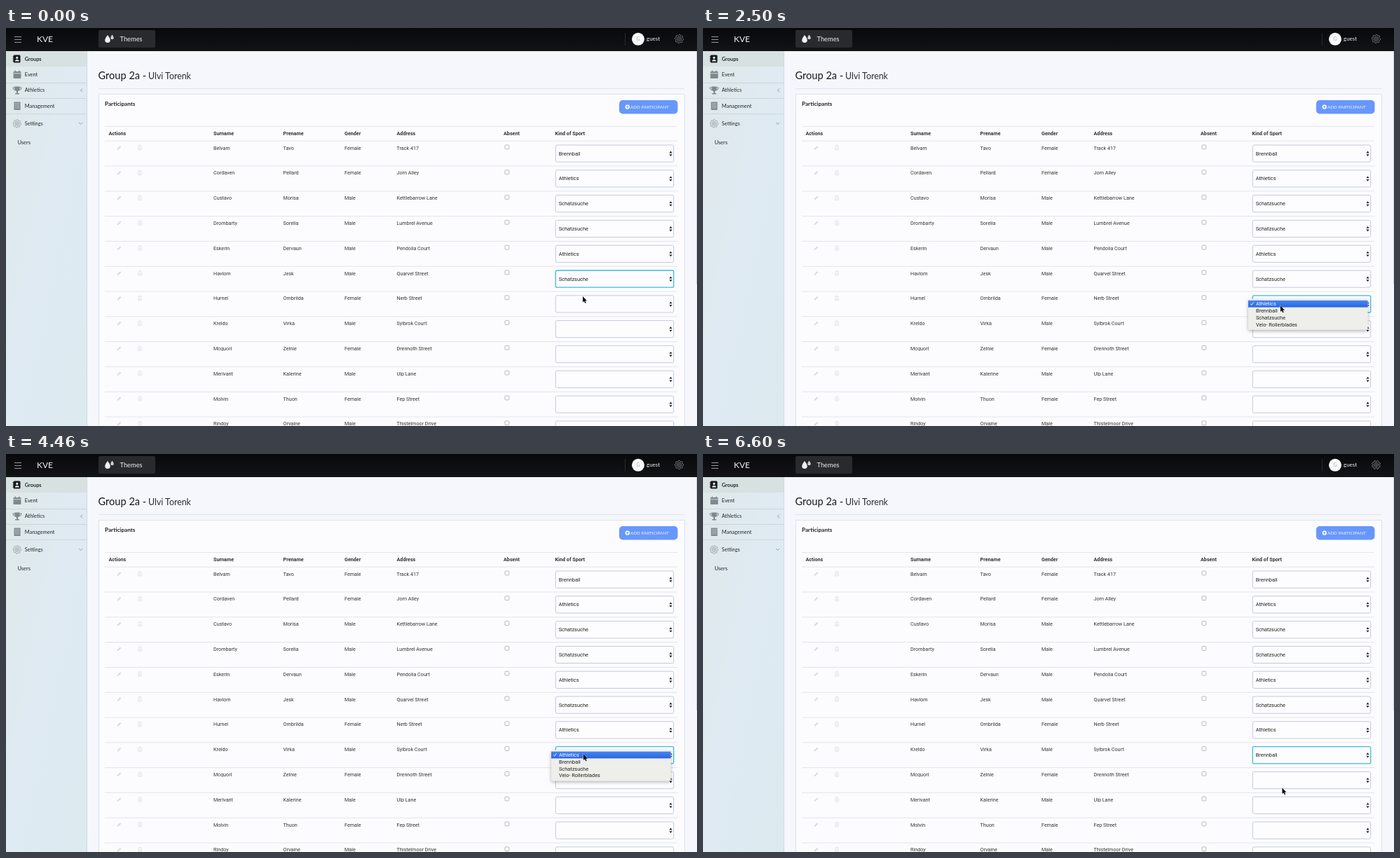
Write an HTML page that moves like this. It is 986x568 px and loops after 6.62 s.

```html
<!DOCTYPE html>
<html lang="en">
<head>
<meta charset="utf-8">
<title>Participants</title>
<style>
  html, body { margin: 0; width: 100%; height: 100%; overflow: hidden; background: #f5f7fd; }
  svg { display: block; width: 986px; height: 568px; }
  text { white-space: pre; }
  .ui { font-family: Lato, sans-serif; }
  .body { font-family: Roboto, sans-serif; font-size: 7.2px; fill: #333; }
  .value { font-family: Roboto, sans-serif; font-size: 7.4px; fill: #222; }
</style>
</head>
<body>
<svg id="stage" viewBox="0 0 986 568" xmlns="http://www.w3.org/2000/svg">
  <defs>
    <linearGradient id="side" x1="0" y1="0" x2="1" y2="1">
      <stop offset="0" stop-color="#dfe9e9"/><stop offset=".5" stop-color="#dfeaf3"/><stop offset="1" stop-color="#dcebf0"/>
    </linearGradient>
    <linearGradient id="bar" x1="0" y1="0" x2="0" y2="1">
      <stop offset="0" stop-color="#08090c"/><stop offset="1" stop-color="#121315"/>
    </linearGradient>
    <linearGradient id="pick" x1="0" y1="0" x2="0" y2="1">
      <stop offset="0" stop-color="#4585f3"/><stop offset="1" stop-color="#2b66e2"/>
    </linearGradient>
    <filter id="shadow" x="-10%" y="-20%" width="120%" height="150%">
      <feDropShadow dx="0" dy="2" stdDeviation="2.5" flood-color="#000" flood-opacity=".3"/>
    </filter>
  </defs>
</svg>
<script>
const LOOP = 6620, PITCH = 35.8;
const OPTIONS = ['Athletics', 'Brennball', 'Schatzsuche', 'Velo- Rollerblades'];
const PEOPLE = [
  ['Belvarn', 'Tavo', 'Female', 'Track 417', 1],
  ['Cordaven', 'Pellard', 'Female', 'Jorn Alley', 0],
  ['Custavo', 'Morisa', 'Male', 'Kettlebarrow Lane', 2],
  ['Drombarty', 'Sorelia', 'Male', 'Lumbrel Avenue', 2],
  ['Eskerin', 'Dervaun', 'Male', 'Pendolia Court', 0],
  ['Havlom', 'Jesk', 'Male', 'Quarvel Street', 2],
  ['Hurnel', 'Ombrilda', 'Female', 'Nerb Street'],
  ['Kreldo', 'Virka', 'Male', 'Sylbrok Court'],
  ['Mcquorl', 'Zelnie', 'Female', 'Drennoth Street'],
  ['Merivant', 'Kalerine', 'Male', 'Ulp Lane'],
  ['Molvin', 'Thuon', 'Female', 'Fep Street'],
  ['Rindoy', 'Orvaine', 'Male', 'Thistelmoor Drive']
];
const COLUMNS = [296, 395.5, 483, 557.5];

// Each visit to a list: which row, when it opens, takes focus, blinks, fades and sets the value
const VISITS = [
  { row: 6, choice: 0, open: 780, focus: 1200, blink: 2590, fade: 2700, closed: 2900, set: 3000 },
  { row: 7, choice: 1, open: 3740, focus: 3960, blink: 5440, fade: 5560, closed: 5720, set: 5780 }
];
const CURSOR = [
  [0, 823, 383], [640, 823, 393], [1000, 823, 393], [1500, 824, 396.5], [2600, 824, 396.5],
  [2960, 823.5, 407.5], [3100, 823.5, 408], [3640, 824, 428.5], [4760, 824, 428.5],
  [5180, 824, 436.5], [5700, 824, 436.5], [6500, 826.5, 476.5], [LOOP, 826.5, 476.5]
];

const stage = document.getElementById('stage');

function add(parent, tag, attrs, content) {
  const node = document.createElementNS('http://www.w3.org/2000/svg', tag);
  for (const key in attrs) node.setAttribute(key, attrs[key]);
  if (content !== undefined) node.textContent = content;
  parent.appendChild(node);
  return node;
}
const rect = (x, y, width, height, fill, more, parent = stage) =>
  add(parent, 'rect', { x, y, width, height, fill, ...more });
const path = (d, stroke, width = 1, more, parent = stage) =>
  add(parent, 'path', { d, stroke, 'stroke-width': width, fill: 'none', ...more });
const circle = (cx, cy, r, fill, more, parent = stage) =>
  add(parent, 'circle', { cx, cy, r, fill, ...more });
const label = (x, y, content, kind, more, parent = stage) =>
  add(parent, 'text', { x, y, class: kind, ...more }, content);
const ui = (x, y, content, size, fill = '#222', weight = 400, more) =>
  label(x, y, content, 'ui', { 'font-size': size, fill, 'font-weight': weight, ...more });

function gear(x, y, r, color, width) {
  const group = add(stage, 'g', { transform: `translate(${x} ${y})` });
  const wheel = add(group, 'g', {});
  let d = '';
  for (let i = 0; i < 32; i++) {
    const a = i * Math.PI / 16, q = i % 4 < 2 ? r : r * 0.8;
    d += `${i ? 'L' : 'M'}${(q * Math.cos(a)).toFixed(2)} ${(q * Math.sin(a)).toFixed(2)}`;
  }
  path(d + 'Z', color, width, {}, wheel);
  circle(0, 0, r * 0.5, 'none', { stroke: color, 'stroke-width': width }, wheel);
  circle(0, 0, r * 0.2, 'none', { stroke: color, 'stroke-width': width }, wheel);
  return wheel;
}

function drawSidebar() {
  rect(0, 33, 115, 535, 'url(#side)');
  rect(0, 33, 115, 22, '#d8e1e2');
  path('M0 78.5H115M0 100.5H115M0 122.5H115', '#c6d2d6', 0.8);
  path('M115.5 33V568', '#cfd9e2');
  const items = [['Groups', 47, 700], ['Event', 69], ['Athletics', 91.3], ['Management', 113.6], ['Settings', 138.6]];
  for (const [name, y, weight] of items) ui(26.8, y, name, 7.4, '#222a2e', weight);
  ui(16.5, 165.5, 'Users', 7.5, '#222a2e');

  rect(10.5, 38.5, 10, 11, '#16191b', { rx: 1.5 });
  circle(15.8, 42.4, 1.6, '#e4eaea');
  path('M12.8 47.6Q13 45 15.8 45T18.8 47.6Z', 'none', 0, { fill: '#e4eaea' });
  path('M9.6 41H11.4M9.6 44H11.4M9.6 47H11.4', '#16191b');

  const grey = '#7f898d';
  rect(10.5, 62, 11, 10, grey, { rx: 1 });
  path('M10.5 64.7H21.5', '#dce7ea', 0.8);
  path('M13.2 60.5V63M18.8 60.5V63', grey, 1.4);
  path('M12.3 83.5H19.7V87Q19.2 90.2 16 90.5Q12.8 90.2 12.3 87ZM15 90H17V93H19V94.5H13V93H15Z', 'none', 0, { fill: grey });
  path('M12.3 85H9.8Q10 88.5 13.3 88.8M19.7 85H22.2Q22 88.5 18.7 88.8', grey, 1);
  rect(11.5, 105.5, 9, 11.5, grey);
  path('M13.8 107V115M16 107V115M18.2 107V115', '#dce7ea', 1, { 'stroke-dasharray': '1.4 1' });
  gear(15.8, 136.5, 5.8, '#8d979b', 0.8);
  path('M109 86.5L106.5 89L109 91.5M104.2 135L106.7 137.5L109.2 135', '#7d888c', 0.8);
}

function drawHeader() {
  rect(0, 0, 986, 33, 'url(#bar)');
  path('M12 12.5H22M12 16.5H22M12 20.5H22', '#a8a8a8', 0.9);
  ui(44, 20, 'KVE', 12, '#f2f2f2');
  rect(132, 3, 81, 25, '#292a2e', { rx: 2 });
  path('M145 10Q148.8 15 148.8 17.2A3.8 3.8 0 0 1 141.2 17.2Q141.2 15 145 10Z', 'none', 0, { fill: '#f1f1f3' });
  path('M151.5 9.5Q153.8 12.6 153.8 14A2.3 2.3 0 0 1 149.2 14Q149.2 12.6 151.5 9.5Z', 'none', 0, { fill: '#cfd0d4' });
  ui(162.5, 19.2, 'Themes', 9.3, '#eee');
  path('M883.5 7V25', '#303236', 0.8);
  circle(902, 15.8, 9, '#fafafa');
  ui(902, 18.2, 'G', 6.8, '#aaa', 400, { 'text-anchor': 'middle' });
  ui(914, 18.4, 'guest', 8, '#f0f0f0');
  return gear(960.5, 15.5, 6.2, '#85878b', 0.8);
}

function drawCard() {
  ui(131.5, 73, 'Group 2a -', 14.6, '#171a1d');
  ui(203, 73, 'Ulvi Torenk', 12.4, '#2a2d30');
  path('M132 86.5H968', '#dfe3ee', 0.9);
  rect(132.5, 94.5, 836, 490, '#fcfcfe', { stroke: '#dde1ea' });
  path('M985.5 33V366', '#d0d5e2');
  ui(141, 111, 'Participants', 8.2, '#1d2023', 700);
  rect(875, 103, 83.5, 19.5, '#6897fb', { rx: 5 });
  circle(886.8, 112.6, 3.2, '#fff');
  path('M885 112.6H888.6M886.8 110.8V114.4', '#6897fb', 1);
  ui(891, 114.8, 'ADD PARTICIPANT', 6.3, '#f1f5ff');
  path('M141 140.5H958M141 161.2H958', '#dfe2e8', 0.9);
  const heads = [[146.5, 'Actions'], [296, 'Surname'], [395.5, 'Prename'], [483, 'Gender'],
    [557.5, 'Address'], [710, 'Absent'], [783.5, 'Kind of Sport']];
  for (const [x, name] of heads) label(x, 153.3, name, 'body', { 'font-weight': 700 });
}

function drawRow(person, i) {
  const y = i * PITCH;
  const row = add(stage, 'g', { transform: `translate(0 ${y.toFixed(1)})` });
  path('M141 197H958', '#dfe2e8', 0.9, {}, row);
  path('M158.5 173.8L159 172L162.8 168.2L164.3 169.7L160.4 173.4Z', 'none', 0, { fill: '#d9dade' }, row);
  path('M188.2 168.7H193.8M190 168V167.4H192V168M188.8 169.5V174H193.2V169.5M190.2 170.5V173M191.8 170.5V173', '#dcdde1', 0.7, {}, row);
  COLUMNS.forEach((x, c) => label(x, 173.5, person[c], 'body', {}, row));
  rect(712, 167, 5.8, 5.8, '#fff', { rx: 1.2, stroke: '#a3a5aa', 'stroke-width': 0.8 }, row);
  const box = rect(784.3, 167, 168.4, 24.2, '#fdfdff', { rx: 2, stroke: '#bfc3d8', 'stroke-width': 0.9 }, row);
  path('M946.4 178.4L948.5 175.6L950.6 178.4ZM946.4 180.2L948.5 183L950.6 180.2Z', 'none', 0, { fill: '#222' }, row);
  const value = label(788.7, 181.5, OPTIONS[person[4]] || '', 'value', {}, row);
  return { box, value };
}

function drawMenu() {
  const group = add(stage, 'g', {});
  rect(778, 0, 170.5, 44, '#eeeeeb', { rx: 2.5, filter: 'url(#shadow)' }, group);
  const bar = rect(778, 2.3, 170.5, 9.8, 'url(#pick)', {}, group);
  const check = path('M781.2 7.2L782.7 9L785.4 4.9', '#222', 0.9, {}, group);
  const items = OPTIONS.map((name, i) => label(788.9, 9.7 + i * 9.8, name, 'value', {}, group));
  return { group, bar, check, items };
}

rect(0, 0, 986, 568, '#f5f7fd');
drawSidebar();
const wheel = drawHeader();
drawCard();
const rows = PEOPLE.map(drawRow);
const menu = drawMenu();
const pointer = path('M0 0V8.4L1.9 6.7L3.3 9.8L4.7 9.2L3.3 6.2H5.9Z', '#fff', 0.7,
  { fill: '#000', 'paint-order': 'stroke' });

function cursorAt(t) {
  const next = CURSOR.findIndex(key => key[0] > t);
  const [t0, x0, y0] = CURSOR[next - 1], [t1, x1, y1] = CURSOR[next];
  const p = (t - t0) / (t1 - t0), e = p * p * (3 - 2 * p);
  return [x0 + (x1 - x0) * e, y0 + (y1 - y0) * e];
}

function showMenu(t, cursorY) {
  const visit = VISITS.find(v => t >= v.open && t < v.closed);
  menu.group.style.display = visit ? '' : 'none';
  if (!visit) return;
  const top = 179 + visit.row * PITCH - 7.3;
  const under = Math.floor((cursorY - top - 2.3) / 9.8);
  const blinking = t >= visit.blink && t < visit.blink + 80;
  const hover = blinking ? -1 : t >= visit.blink ? visit.choice : Math.max(0, Math.min(3, under));
  menu.group.setAttribute('transform', `translate(0 ${top})`);
  menu.group.setAttribute('opacity', Math.min(1, (visit.closed - t) / (visit.closed - visit.fade)));
  menu.bar.style.display = hover < 0 ? 'none' : '';
  menu.bar.setAttribute('y', 2.3 + Math.max(0, hover) * 9.8);
  menu.check.setAttribute('stroke', hover === 0 ? '#fff' : '#222');
  menu.items.forEach((item, i) => { item.style.fill = i === hover ? '#fff' : '#222'; });
}

function render(t) {
  const [x, y] = cursorAt(t);
  pointer.setAttribute('transform', `translate(${x} ${y})`);
  wheel.setAttribute('transform', `rotate(${t * 0.18})`);
  const focused = VISITS.reduce((row, v) => t >= v.focus ? v.row : row, 5);
  rows.forEach(({ box }, i) => {
    box.setAttribute('stroke', i === focused ? '#3fbbdc' : '#bfc3d8');
    box.setAttribute('stroke-width', i === focused ? 1.3 : 0.9);
  });
  for (const v of VISITS) rows[v.row].value.textContent = t >= v.set ? OPTIONS[v.choice] : '';
  showMenu(t, y);
}

const start = performance.now();
function tick() {
  render((performance.now() - start) % LOOP);
  requestAnimationFrame(tick);
}
tick();
</script>
</body>
</html>
```
